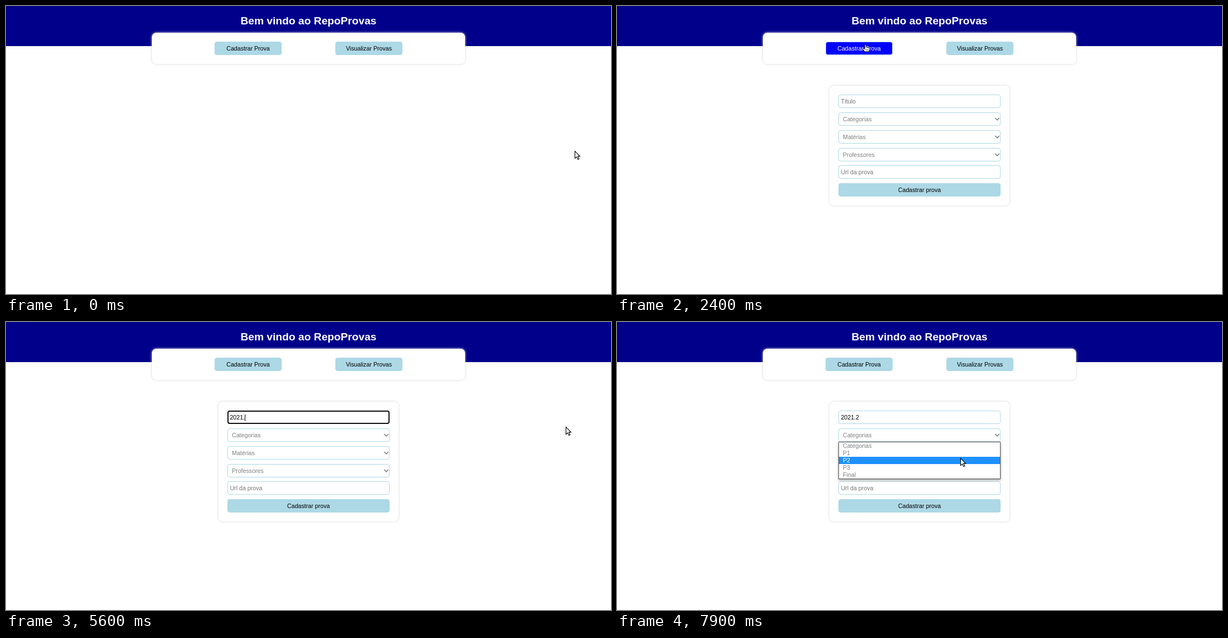
An HTML page that plays this animation: 1082 by 517 pixels, repeating every 8000 ms.

```html
<!DOCTYPE html>
<html lang="pt-BR">
<head>
<meta charset="utf-8">
<title>RepoProvas</title>
<style>
  html, body { margin: 0; width: 100%; height: 100%; overflow: hidden; background: #fff; }
  body { position: relative; font: 10.667px/12px "Liberation Sans", Arial, sans-serif; color: #000; }
  div, svg { position: absolute; box-sizing: border-box; white-space: pre; }
  header { position: absolute; left: 0; top: 0; width: 1082px; height: 72px; background: #00008b; }
  h1 { position: absolute; left: 0; top: 16px; width: 1082px; margin: 0; text-align: center;
       font: bold 19.2px/21px "Liberation Sans", Arial, sans-serif; color: #fff; }
  .card { background: #fff; border-radius: 8px; box-shadow: 0 0 4px lightgray; }
  .box { height: 24px; border: 1px solid lightblue; border-radius: 4px; line-height: 12px; padding-top: 5px; }
  .btn { background: lightblue; text-align: center; }
  .btn.hover { background: #00f; color: #fff; }
  .row { left: 16px; width: 290px; background: #fff; color: #757575; }
  .input { padding-left: 3.4px; }
  .select { padding-left: 7px; color: #808080; }
  .select svg { left: 278px; top: 8px; }
  .row.btn { background: lightblue; color: #000; }
  #ring { left: 396px; top: 159px; width: 290px; height: 24px; border: 2px solid #101010; border-radius: 4px; }
  #caret { top: 166px; width: 1px; height: 12px; background: #000; }
  #list { left: 396px; top: 215px; width: 290px; height: 67px; background: #fff;
          border: 1px solid #555; box-shadow: 0 2px 4px rgba(0, 0, 0, .4); }
  #list div { left: 0; width: 288px; height: 13px; padding-left: 7px; line-height: 12px; color: #808080; }
  #list .on { background: #1e90ff; color: #fff; }
  .cursor { left: 0; top: 0; overflow: visible; }
</style>
</head>
<body>
<header><h1>Bem vindo ao RepoProvas</h1></header>
<div class="card" style="left:261px;top:48px;width:560px;height:56px">
  <div id="register" class="box btn" style="left:112px;top:16px;width:120px">Cadastrar Prova</div>
  <div class="box btn" style="left:328px;top:16px;width:120px">Visualizar Provas</div>
</div>
<div id="form" class="card" style="left:380px;top:143px;width:322px;height:215px"></div>
<div id="ring"></div>
<div id="caret"></div>
<div id="list"></div>

<svg id="arrow" class="cursor" width="12" height="17">
  <path d="M.5 .6V13.6L3.5 10.8L5.8 15.4L7.9 14.4L5.7 9.9H9.5Z" fill="#fff" stroke="#000" stroke-width="1.1"/>
</svg>
<svg id="hand" class="cursor" width="14" height="14">
  <path d="M-.9 7V1Q-.9 -.4 .2 -.4T1.3 1V4.3Q2.6 3.6 3.4 4.8Q4.8 4.2 5.4 5.3Q7.5 5 7.5 7V9L6.4 12.4H-.8L-4.2 8.2Q-4.8 6.9 -3.4 6.5Q-2.5 6.4 -.9 8Z" fill="#fff" stroke="#000" stroke-width=".9"/>
  <path d="M1.2 8V10.6M3 8V10.6M4.8 8V10.6" stroke="#000" stroke-width=".6"/>
</svg>
<svg id="beam" class="cursor" width="10" height="14">
  <g fill="none"><path id="bar" d="M-3.5 -6H-1.2Q0 -6 0 -5V5Q0 6 -1.2 6H-3.5M3.5 -6H1.2Q0 -6 0 -5V5Q0 6 1.2 6H3.5" stroke="#fff" stroke-width="2.6"/>
  <use href="#bar" style="stroke:#000"/>
  <path d="M-3.5 -6H-1.2Q0 -6 0 -5V5Q0 6 -1.2 6H-3.5M3.5 -6H1.2Q0 -6 0 -5V5Q0 6 1.2 6H3.5" stroke="#000" stroke-width="1.3"/></g>
</svg>

<script>
const LOOP = 8000;
const $ = id => document.getElementById(id);

function add(parent, cls, top, text) {
  const el = document.createElement('div');
  el.className = cls;
  el.style.top = top + 'px';
  el.textContent = text;
  return parent.appendChild(el);
}

const chevron = '<svg width="10" height="7"><path d="M1.3 1L5 4.8L8.7 1" fill="none" stroke="#808080" stroke-width="1.7"/></svg>';
const [title] = [
  ['input', 16, 'Título'],
  ['select', 48, 'Categorias'],
  ['select', 80, 'Matérias'],
  ['select', 112, 'Professores'],
  ['input', 143, 'Url da prova'],
  ['btn', 175, 'Cadastrar prova']
].map(([kind, top, text]) => {
  const el = add($('form'), 'box row ' + kind, top, text);
  if (kind === 'select') el.insertAdjacentHTML('beforeend', chevron);
  return el;
});
const options = ['Categorias', 'P1', 'P2', 'P3', 'Final'].map((name, i) => add($('list'), '', i * 13, name));

const at = (kind, x, y) => ({ kind, x, y });
const typed = (text, caret) => ({ text, caret });

// Each step changes only the listed parts of the state.
const steps = [
  [0, { ...at('arrow', 1017, 260), hover: false, form: false, focus: false, text: '', caret: 0, pick: -1 }],
  [1100, at('arrow', 1008, 251)],
  [1200, at('arrow', 962, 225)],
  [1300, at('arrow', 882, 190)],
  [1400, at('arrow', 782, 156)],
  [1500, at('arrow', 682, 126)],
  [1600, at('arrow', 592, 104)],
  [1700, at('arrow', 518, 90)],
  [1800, { ...at('hand', 464, 77), hover: true }],
  [1900, at('hand', 444, 69.5)],
  [2400, { form: true }],
  [2600, at('hand', 448, 74)],
  [2700, { ...at('arrow', 459, 97), hover: false }],
  [2800, at('arrow', 475, 131)],
  [2900, at('beam', 492, 168)],
  [3100, { focus: true, caret: 400 }],
  [3200, at('beam', 530, 178)],
  [3300, at('beam', 582, 186.5)],
  [3400, at('arrow', 692, 202)],
  [3500, at('arrow', 832, 204)],
  [3600, at('arrow', 952, 196)],
  [3700, { ...at('arrow', 1001, 188), caret: 0 }],
  [4300, typed('20', 412)],
  [4400, typed('202', 418)],
  [4500, typed('2021', 423)],
  [5100, { caret: 0 }],
  [5300, typed('202', 418)],
  [5400, typed('2021', 423)],
  [5600, typed('2021.', 427)],
  [5900, typed('2021.2', 432)],
  [6500, { caret: 0 }],
  [6800, at('arrow', 984, 192)],
  [6900, at('arrow', 880, 177)],
  [7000, { ...at('arrow', 748, 162), caret: 432 }],
  [7100, at('beam', 654, 175)],
  [7300, at('arrow', 632, 196)],
  [7400, at('arrow', 622, 205)],
  [7500, { focus: false, caret: 0, pick: 0 }],
  [7600, at('arrow', 619, 217)],
  [7800, { ...at('arrow', 616, 231), pick: 1 }],
  [7900, { ...at('arrow', 614, 244), pick: 2 }]
];

const show = (el, on) => { el.style.display = on ? 'block' : 'none'; };

function draw(time) {
  const s = Object.assign({}, ...steps.filter(([t]) => t <= time).map(([, change]) => change));
  $('register').classList.toggle('hover', s.hover);
  show($('form'), s.form);
  show($('ring'), s.focus);
  show($('caret'), s.caret);
  $('caret').style.left = s.caret + 'px';
  title.textContent = s.text || 'Título';
  title.style.color = s.text ? '#000' : '';
  show($('list'), s.pick >= 0);
  options.forEach((el, i) => { el.className = i === s.pick ? 'on' : ''; });
  for (const kind of ['arrow', 'hand', 'beam']) show($(kind), kind === s.kind);
  $(s.kind).style.transform = `translate(${s.x}px, ${s.y}px)`;
}

const start = performance.now();
function tick() {
  draw((performance.now() - start) % LOOP);
  requestAnimationFrame(tick);
}
tick();
</script>
</body>
</html>
```
